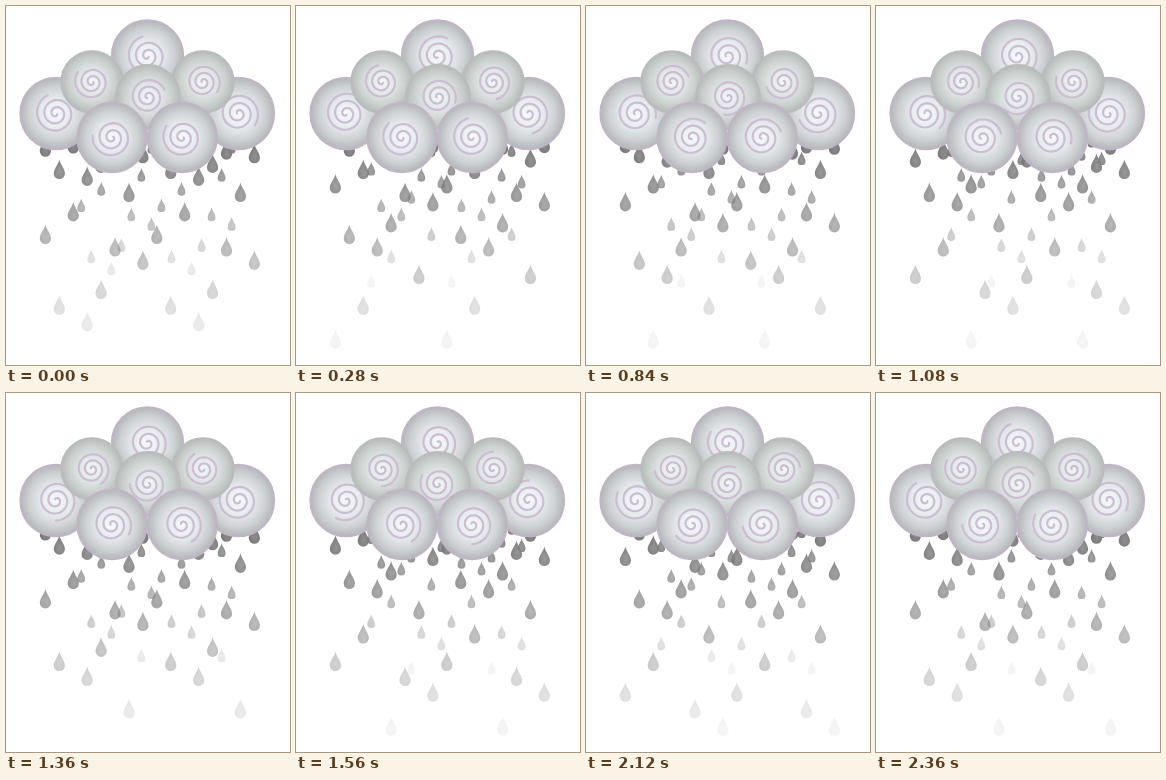
Recreate the animation shown at these times as an HTML page. Size 284x359 px, loop 2400 ms.

```html
<!DOCTYPE html>
<html lang="en">
<head>
<meta charset="utf-8">
<title>Rain cloud</title>
<style>
  html, body { margin: 0; width: 100%; height: 100%; overflow: hidden; background: #fff; }
  svg { display: block; width: 100vw; height: 100vh; }
</style>
</head>
<body>
<svg viewBox="0 0 284 359">
  <defs>
    <radialGradient id="puff">
      <stop offset="0" stop-color="#f6fafc"/>
      <stop offset=".4" stop-color="#e6ebee"/>
      <stop offset=".75" stop-color="#cdd1d4"/>
      <stop offset="1" stop-color="#b4b6b9"/>
    </radialGradient>
    <radialGradient id="puffSmall">
      <stop offset="0" stop-color="#f2f8f8"/>
      <stop offset=".4" stop-color="#e0e7e6"/>
      <stop offset=".75" stop-color="#cad0ce"/>
      <stop offset="1" stop-color="#b5bab8"/>
    </radialGradient>
    <radialGradient id="water" cx=".55" cy=".65" r=".6">
      <stop offset="0" stop-color="#8b8b8c"/>
      <stop offset="1" stop-color="#737374"/>
    </radialGradient>
  </defs>
  <g id="rain"></g>
  <g id="cloud"></g>
</svg>
<script>
const LOOP = 2400, STEP = 40, LIFE = 24;
const rain = document.getElementById('rain');
const cloud = document.getElementById('cloud');

function add(parent, tag, attrs) {
  const el = document.createElementNS('http://www.w3.org/2000/svg', tag);
  for (const key in attrs) el.setAttribute(key, attrs[key]);
  parent.appendChild(el);
  return el;
}

// Age of each column's drop at time zero, in steps; repeats every 8 columns.
const ages = [15, 20, 13, 21, 19, 16, 11, 17];
const layers = [
  { x: 75.2, gap: 10.03, top: 133.7, pull: 0.292, size: 0.7 },
  { x: 39.4, gap: 13.93, top: 137.6, pull: 0.404, size: 1 }
];
const DROP = 'M0-10C.8-5.5 5.6-.8 5.6 4A5.6 5.6 0 0 1-5.6 4C-5.6-.8-.8-5.5 0-10Z';
const drops = [];
for (const layer of layers) {
  for (let col = 0; col < 16; col++) {
    for (const lag of [0, LIFE / 2]) {
      drops.push({
        layer,
        x: layer.x + col * layer.gap,
        age: ages[col % 8] + lag,
        el: add(rain, 'path', { d: DROP, fill: 'url(#water)' })
      });
    }
  }
}

function spiral(r) {
  const turns = 2.6, n = 110;
  let d = '';
  for (let i = 0; i <= n; i++) {
    const a = turns * 2 * Math.PI * i / n;
    const q = r * (0.04 + 0.52 * i / n);
    d += (i ? 'L' : 'M') + (q * Math.cos(a)).toFixed(2) + ' ' + (q * Math.sin(a)).toFixed(2);
  }
  return d;
}

// Centre, radius, starting angle of the swirl, fill.
const puffs = [
  [141.5, 50, 36, 40, 'puff'],
  [50, 107.5, 36, 30, 'puff'],
  [232.5, 107.5, 36, 180, 'puff'],
  [86, 76, 31, 0, 'puffSmall'],
  [197, 76, 31, 180, 'puffSmall'],
  [142, 91, 32.3, 120, 'puffSmall'],
  [106, 131.5, 35, -30, 'puff'],
  [176.3, 131.5, 35, 0, 'puff']
].map(([x, y, r, start, fill]) => {
  const g = add(cloud, 'g', { transform: `translate(${x} ${y})` });
  add(g, 'circle', {
    r, fill: `url(#${fill})`, 'stroke-width': 1.3,
    stroke: fill === 'puff' ? '#c5b2ca' : '#b9bcbc'
  });
  const swirl = add(g, 'path', {
    d: spiral(r), fill: 'none', stroke: '#cdbcd2', 'stroke-width': 2.2, 'stroke-linecap': 'round'
  });
  return { swirl, start };
});

function draw(ms) {
  const step = Math.floor((ms % LOOP) / STEP);
  for (const { layer, x, age, el } of drops) {
    const j = (age + step) % LIFE;
    const y = layer.top + layer.pull * j * j;
    el.setAttribute('transform', `translate(${x.toFixed(2)} ${y.toFixed(2)}) scale(${layer.size})`);
    el.setAttribute('opacity', Math.max(0, 1 - (j / 23) ** 2).toFixed(3));
  }
  const turn = 360 * step * STEP / LOOP;
  for (const { swirl, start } of puffs) {
    swirl.setAttribute('transform', `rotate(${start + turn})`);
  }
}

const t0 = performance.now();
function tick() {
  draw(performance.now() - t0);
  requestAnimationFrame(tick);
}
draw(0);
requestAnimationFrame(tick);
</script>
</body>
</html>
```
